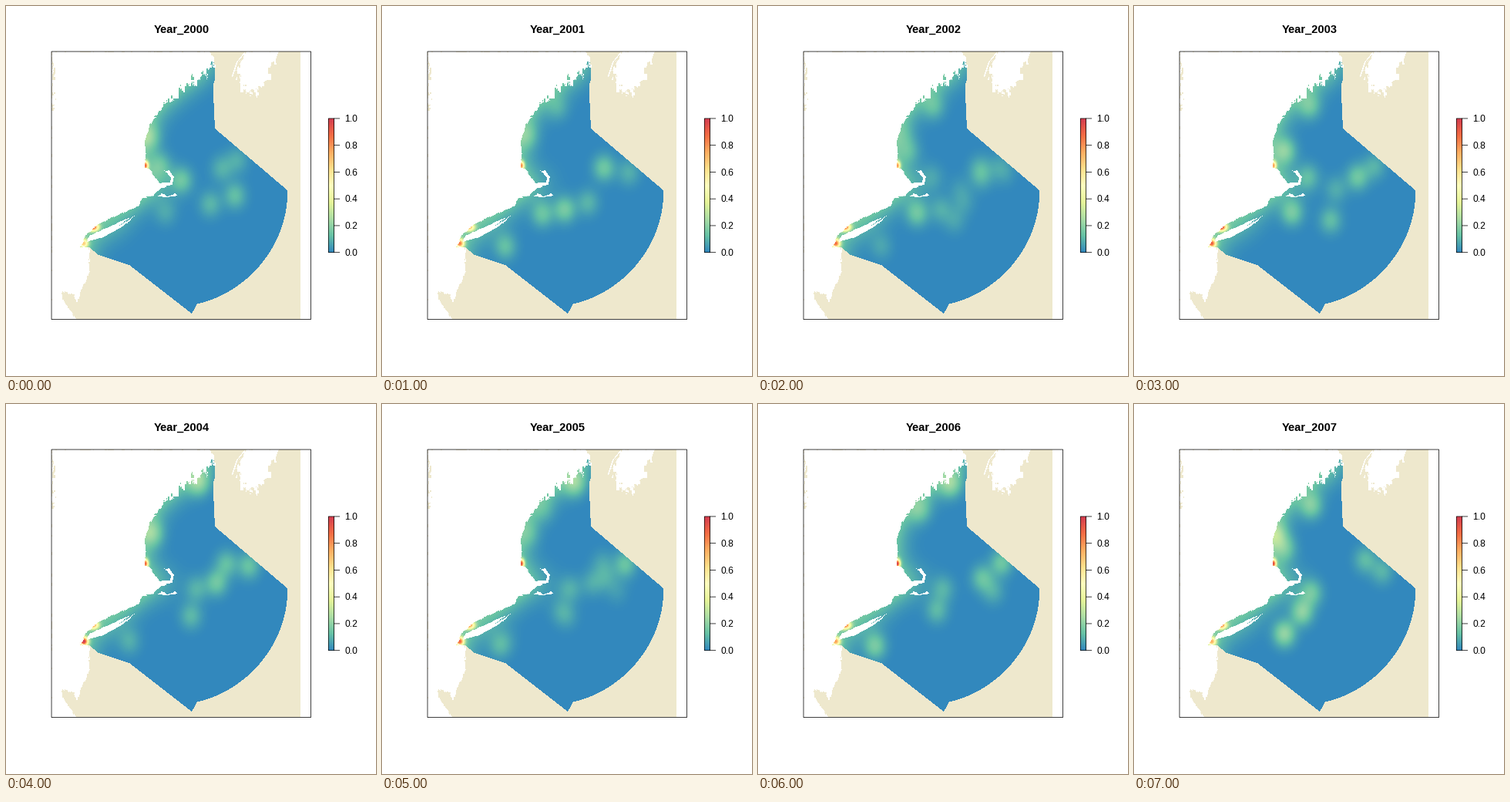
Animation of 480x480 px, one loop 8000 ms. Source, as a matplotlib script:

```python
import numpy as np
import matplotlib.pyplot as plt
from matplotlib.animation import FuncAnimation
from matplotlib.colors import LinearSegmentedColormap
from matplotlib.patches import Rectangle
from matplotlib.path import Path

SIZE, DPI = 480, 72
LINE = 14.4                      # height of one margin line
START, YEARS = 2000, 8
BEIGE = np.array([238, 232, 205]) / 255
SPECTRAL = LinearSegmentedColormap.from_list("spectral", [
    "#3288BD", "#66C2A5", "#ABDDA4", "#E6F598", "#FFFFBF",
    "#FEE08B", "#FDAE61", "#F46D43", "#D53E4F"], N=256)

# Key points of the outlines in pixels, y pointing down; noise roughens them
NORTH = [(59, 59), (263, 59), (270, 67), (269, 76), (248, 95), (222, 117),
         (205, 132), (190, 147), (180, 176), (182, 193), (179, 210)]
CAPE = [(187, 212), (199, 229), (213, 229), (215, 224), (206, 214),
        (212, 214), (218, 222), (217, 231), (200, 237), (190, 246)]
SOUTH = [(177, 249), (172, 260), (140, 273), (119, 284), (104, 297),
         (97, 312), (108, 314), (108, 345), (92, 384), (88, 374),
         (73, 370), (73, 380), (91, 407), (59, 407)]
LONG_ISLAND = [(104, 306), (108, 298), (135, 286), (161, 274), (146, 286),
               (169, 271), (150, 287), (126, 300)]
SOUTH_ISLES = [(197, 247), (203, 243), (209, 247), (214, 246), (219, 243),
               (223, 246), (210, 248)]
EAST_LAND = [(313, 59), (354, 59), (340, 88), (322, 115), (309, 112),
             (300, 95), (301, 76)]
EAST_SLIVER = [(309, 60), (310, 61), (301, 72), (294, 92), (293, 91), (299, 73)]

# Hot spots at the ports: x, y, width, height
PORTS = [(181, 207, 2.5, 4), (113, 287, 5, 3.5), (101, 308, 4, 4)]

# Mean strength and places of the banks, strongest first
BANKS = {
    2000: (.11, [(185, 170), (228, 226), (297, 246), (200, 207), (265, 257),
                 (280, 211), (300, 200), (207, 268)]),
    2001: (.12, [(237, 264), (288, 210), (208, 270), (160, 312), (188, 168),
                 (267, 255), (320, 216), (228, 132)]),
    2003: (.13, [(196, 188), (205, 268), (290, 222), (228, 130), (255, 278),
                 (226, 222), (312, 208), (262, 238)]),
    2004: (.13, [(250, 102), (190, 168), (273, 232), (315, 210), (286, 207),
                 (240, 275), (247, 240), (160, 308)]),
    2006: (.13, [(250, 104), (152, 314), (316, 206), (291, 226), (210, 138),
                 (232, 268), (240, 240), (305, 243)]),
    2007: (.16, [(195, 298), (218, 270), (184, 170), (230, 132), (230, 245),
                 (196, 187), (300, 202), (322, 217)]),
}

rng = np.random.default_rng(4)
gx, gy = np.meshgrid(np.arange(SIZE) + .5, np.arange(SIZE) + .5)


def inside(outline, x, y):
    points = np.column_stack([x.ravel(), y.ravel()])
    return Path(outline).contains_points(points).reshape(gx.shape)


def roughness():
    """Noise of three scales, made of upright cells."""
    noise = 0
    for s in (1, 2, 4):
        cells = rng.uniform(-1, 1, (SIZE // (2 * s), SIZE // s))
        noise = noise + s / 5 * np.kron(cells, np.ones((2 * s, s)))
    return noise


def blur(mask, sigma):
    t = np.arange(-3 * sigma, 3 * sigma + 1)
    kernel = np.exp(-(t / sigma) ** 2 / 2)
    kernel /= kernel.sum()
    out = mask.astype(float)
    for axis in (0, 1):
        out = np.apply_along_axis(np.convolve, axis, out, kernel, "same")
    return out


def bump(x, y, w, h):
    return np.exp(-((gx - x) / w) ** 2 / 2 - ((gy - y) / h) ** 2 / 2)


def study_outline():
    t = np.linspace(0, np.radians(78), 50)
    arc = zip(219 + 146 * np.cos(t) ** 1.04, 244 + 146 * np.sin(t) ** 1.04)
    return [(255, 66), (270, 66), (271, 95), (268.5, 104), (271, 159),
            (365, 239), *arc, (245, 392), (241, 399), (160, 336), (120, 323),
            (108, 313), (95, 313), (95, 280), (165, 200), (165, 120)]


# The northern shore is far more ragged than the rest
ragged = np.clip((gy - 66) / 20, 0, 1) * np.clip((150 - gy) / 30, 0, 1)
jx, jy = gx + (1 + 6 * ragged) * roughness(), gy + (1 + 6 * ragged) * roughness()
land = inside(NORTH + CAPE + SOUTH, jx, jy)
for isle in (LONG_ISLAND, SOUTH_ISLES):
    land |= inside(isle, jx, gy)
east = inside(EAST_LAND, jx, jy) | inside(EAST_SLIVER, gx, gy)
study = inside(study_outline(), gx, gy) & ~land
window = (gx > 59) & (gx < 382) & (gy > 59) & (gy < 406)

base = np.ones((SIZE, SIZE, 3))
base[window & ~land & ~east] = BEIGE
shelf = .24 * blur(land, 15)


def field(year):
    if year not in BANKS:
        return (field(year - 1) + field(year + 1)) / 2
    strength, places = BANKS[year]
    heat = np.random.default_rng(year).uniform(.5, .9, len(PORTS))
    fall = strength * np.linspace(1.3, .6, len(places))
    return (shelf + sum(v * bump(x, y, 10, 12) for v, (x, y) in zip(fall, places))
            + sum(v * bump(*port) for v, port in zip(heat, PORTS)))


def paint(year):
    image = base.copy()
    image[study] = SPECTRAL(np.clip(field(year)[study], 0, 1))[:, :3]
    return image


images = [paint(START + i) for i in range(YEARS)]

fig = plt.figure(figsize=(SIZE / DPI, SIZE / DPI), dpi=DPI, facecolor="white")
ax = fig.add_axes([0, 0, 1, 1])
ax.axis("off")
picture = ax.imshow(images[0], extent=(0, SIZE, SIZE, 0), interpolation="nearest")

left, top, right, bottom = 4.1 * LINE, 4.1 * LINE, 395.5, SIZE - 5.1 * LINE
height = bottom - top
bar_left, bar_right = 425.5 - LINE / 2, 425.5
bar_top, bar_bottom = top + height / 4, bottom - height / 4

ax.imshow(np.linspace(1, 0, 174)[:, None], cmap=SPECTRAL, vmin=0, vmax=1,
          extent=(bar_left, bar_right, bar_bottom, bar_top), interpolation="nearest")
ax.set(xlim=(0, SIZE), ylim=(SIZE, 0), aspect="auto")


def frame(x0, y0, x1, y1):
    ax.add_patch(Rectangle((x0, y0), x1 - x0, y1 - y0, fill=False, ec="black",
                           lw=.75, snap=False, zorder=3))


frame(left, top, right, bottom)
frame(bar_left, bar_top, bar_right, bar_bottom)
for value in np.linspace(0, 1, 6):
    y = bar_bottom + value * (bar_top - bar_bottom)
    ax.plot([bar_right, bar_right + LINE / 2], [y, y], color="black", lw=.75,
            snap=False)
    ax.text(bar_right + LINE - .4, y + 4.3, f"{value:.1f}",
            family="Liberation Sans", size=12, va="baseline")
title = ax.text((left + right) / 2 + .3, 35, "", family="Liberation Sans",
                weight="bold", size=14.6, ha="center", va="baseline")


def update(i):
    picture.set_data(images[i])
    title.set_text(f"Year_{START + i}")
    return picture, title


anim = FuncAnimation(fig, update, frames=YEARS, interval=1000, repeat=True,
                     repeat_delay=0)
plt.show()
```
